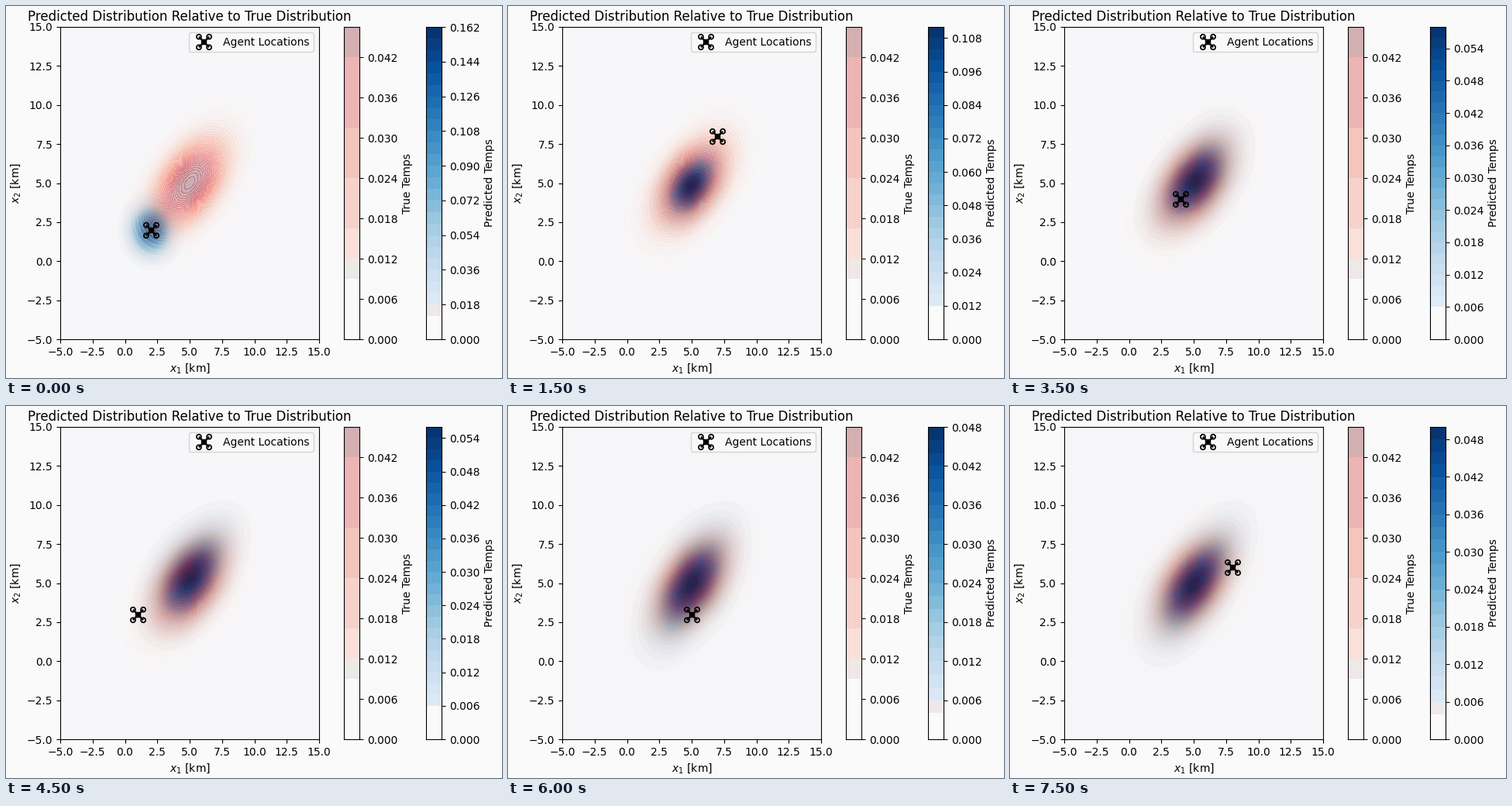
Write a matplotlib script that moves like this. It is 640x480 px and loops after 8 s.

```python
import numpy as np
import matplotlib.pyplot as plt
from matplotlib.animation import FuncAnimation
from matplotlib.path import Path

W, H, DPI = 640, 480, 100
BG = "#fafafa"

# agent x, y | belief mean x, y | spread x, y | peak | level step
STEPS = [
    (2, 2, 2.0, 2.0, 1.00, 1.00, .1590, .006),
    (4, 4, 3.5, 3.5, 1.00, 1.00, .1590, .006),
    (6, 6, 4.65, 4.7, 1.00, 1.00, .1590, .006),
    (7, 8, 4.95, 4.8, 1.25, 1.25, .1100, .004),
    (8, 7, 5.2, 4.7, 1.60, 1.45, .0830, .003),
    (8, 6, 5.4, 4.7, 1.75, 1.35, .0830, .003),
    (6, 5, 5.3, 5.0, 1.80, 1.65, .0615, .002),
    (4, 4, 5.2, 5.2, 1.80, 1.75, .0575, .002),
    (2, 4, 5.1, 5.4, 1.85, 1.90, .0515, .002),
    (1, 3, 5.1, 5.5, 1.75, 1.85, .0555, .002),
    (2, 2, 5.0, 5.3, 1.85, 2.05, .0495, .002),
    (4, 1, 5.0, 5.0, 1.85, 2.27, .0430, .0015),
    (5, 3, 5.0, 4.9, 1.85, 2.15, .0475, .002),
    (6, 5, 5.0, 4.8, 1.80, 2.08, .0515, .002),
    (7, 6, 5.0, 4.85, 1.85, 2.10, .0515, .002),
    (8, 6, 5.0, 4.9, 1.90, 2.10, .0495, .002),
]

TRUE_BANDS = np.repeat(
    ["#fafafa", "#eee8e7", "#fbe0d9", "#f6d2cb", "#f5c4bd", "#edb4b4", "#d5b0b3"],
    [6, 2, 3, 5, 5, 7, 3])

grid = np.linspace(-5, 15, 201)
X, Y = np.meshgrid(grid, grid)


def bell(mx, my, sx, sy, peak, wobble=0.0, phase=0.0):
    """Correlated Gaussian whose correlation follows from its peak height."""
    u, v = (X - mx) / sx, (Y - my) / sy
    q = min(1.0, (1 / (2 * np.pi * peak * sx * sy)) ** 2)
    rho = np.sqrt(1 - q)
    d2 = (u * u - 2 * rho * u * v + v * v) / q
    a = np.arctan2(v, u)
    ripple = np.sin(3 * a + phase) + 0.7 * np.sin(5 * a - 2 * phase)
    return peak * np.exp(-0.5 * d2 * (1 + wobble * ripple))


def make_levels(peak, step):
    return np.round(np.arange(np.ceil(peak / step) + 1) * step, 4)


def polygon(points):
    points = np.asarray(points, float)
    return Path(np.vstack([points, points[:1]]), closed=True)


def drone():
    """Quadcopter outline in pixels: four rotor rings, crossed arms, a body."""
    t = np.linspace(0, 2 * np.pi, 28, endpoint=False)
    circle = np.column_stack([np.cos(t), np.sin(t)])
    parts = [polygon([(-3.7, -3.7), (3.7, -3.7), (3.7, 3.7), (-3.7, 3.7)])]
    for sx in (-1, 1):
        for sy in (-1, 1):
            hub = np.array([6.6 * sx, 6.8 * sy])
            parts.append(polygon(hub + 3.9 * circle))
            parts.append(polygon(hub + 2.1 * circle[::-1]))
            side = np.array([-hub[1], hub[0]]) / np.hypot(*hub) * 1.1
            parts.append(polygon([-side, hub - side, hub + side, side]))
    return Path.make_compound_path(*parts)


DRONE = drone()
DRONE_SIZE = 2 * np.abs(DRONE.vertices).max() * 72 / DPI

TRUE_PEAK = 1 / (2 * np.pi * np.sqrt(12))
TRUE = bell(5, 5, 2, 2, TRUE_PEAK)
TRUE_LEVELS = make_levels(TRUE_PEAK, .0015)

fig = plt.figure(figsize=(W / DPI, H / DPI), dpi=DPI, facecolor=BG)
ax = fig.add_axes([0.1, 0.1, 0.5, 0.8])
true_ax = fig.add_axes([0.7, 0.1, 0.03, 0.8])
pred_ax = fig.add_axes([0.85, 0.1, 0.03, 0.8])


def place(axes, left, right, bottom=50, top=453):
    axes.set_position([left / W, bottom / H, (right - left) / W, (top - bottom) / H])


def draw_bar(axes, levels, colors, label, digits=3):
    axes.clear()
    axes.imshow(np.array(colors)[:, None, :], extent=(0, 1, 0, levels[-1]),
                origin="lower", aspect="auto", interpolation="nearest")
    ticks = levels[::int(np.ceil(len(levels) / 10))]
    axes.set_xticks([])
    axes.yaxis.tick_right()
    axes.yaxis.set_label_position("right")
    axes.set_yticks(ticks, [f"{v:.{digits}f}" for v in ticks])
    axes.set_ylabel(label)


def pred_bands(n):
    colors = plt.cm.Blues((np.arange(n) + 0.5) / n)[:, :3]
    colors[:3] = plt.matplotlib.colors.to_rgb(BG)
    if n < 28:
        colors[2] = plt.matplotlib.colors.to_rgb("#eee9e8")
    return colors


def draw_map(i, px, py, belief, levels, coarse):
    ax.clear()
    ax.contourf(X, Y, belief, levels=levels, cmap="Blues")
    ax.contourf(X, Y, TRUE, levels=TRUE_LEVELS, cmap="Reds", alpha=0.3)
    ax.plot([px], [py], ls="none", marker=DRONE, ms=DRONE_SIZE, mew=0,
            color="black", zorder=5, label="Agent Locations")
    ax.set(xlim=(-5, 15), ylim=(-5, 15), xlabel="$x_1$ [km]", ylabel="$x_2$ [km]")
    ax.set_title("Predicted Distribution Relative to True Distribution")
    fine = np.arange(-5, 15.1, 2.5)
    names = [f"{v:.1f}".replace("-", "\u2212") for v in fine]
    ax.set_yticks(fine, names)
    if coarse:
        ax.set_xticks(fine[::2], [n[:-2] for n in names[::2]])
    else:
        ax.set_xticks(fine, names)
    ax.legend(loc="upper right", facecolor=BG)


def update(i):
    px, py, mx, my, sx, sy, peak, step = STEPS[i]
    levels = make_levels(peak, step)
    belief = bell(mx, my, sx, sy, peak, 0.04 if i > 2 else 0.0, i)
    # four-digit tick labels squeeze the layout to the left
    wide = step == .0015
    place(ax, 70, 396 if wide else 404)
    place(true_ax, *((428, 448) if wide else (436, 456)))
    place(pred_ax, *((533, 553) if wide else (542, 562)))
    draw_map(i, px, py, belief, levels, wide)
    draw_bar(true_ax, TRUE_LEVELS,
             [plt.matplotlib.colors.to_rgb(c) for c in TRUE_BANDS], "True Temps")
    draw_bar(pred_ax, levels, pred_bands(len(levels) - 1), "Predicted Temps",
             4 if wide else 3)
    return []


anim = FuncAnimation(fig, update, frames=len(STEPS), interval=500,
                     repeat=True, repeat_delay=0, blit=False)
plt.show()
```
